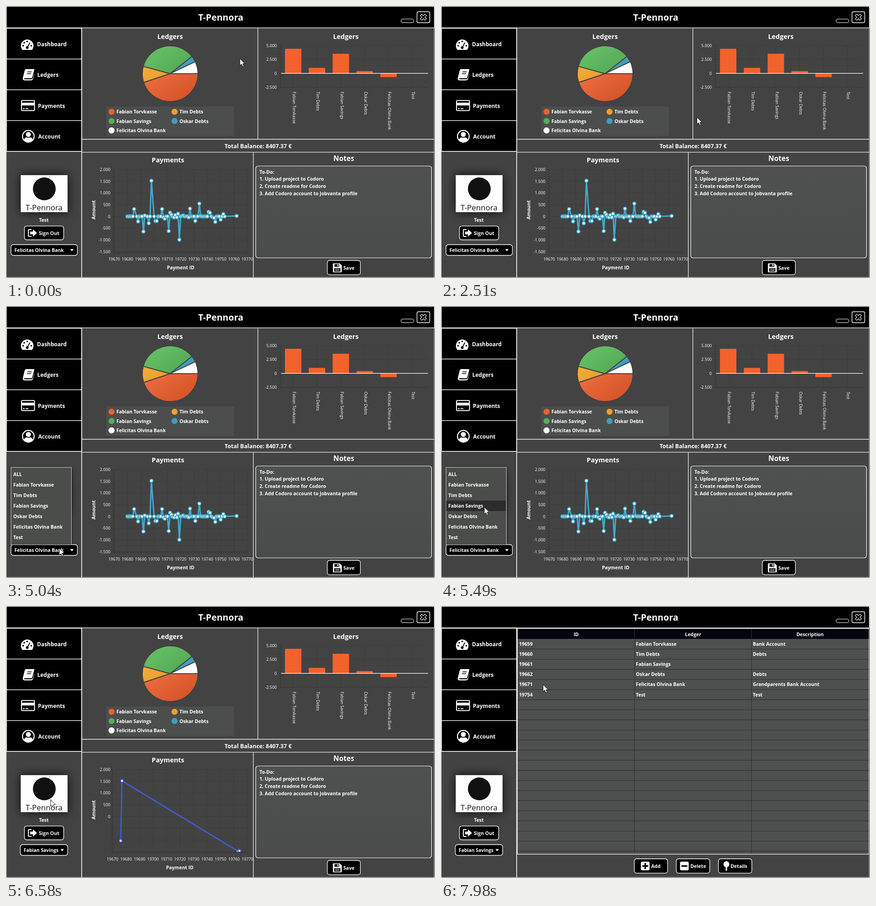
Animation of 941 by 595 pixels, one loop 8000 ms. Source, as an HTML page:

```html
<!DOCTYPE html>
<html lang="en">
<head>
<meta charset="utf-8">
<title>T-Pennora</title>
<style>
  html, body { margin: 0; width: 100%; height: 100%; overflow: hidden; background: #434343; }
  svg { display: block; font-family: "Open Sans", "Noto Sans", sans-serif; }
  text { fill: #fff; white-space: pre; }
</style>
</head>
<body>
<svg id="stage" width="941" height="595" viewBox="0 0 941 595"></svg>
<script>
const APP = 'T-Pennora';
const LEDGERS = ['Fabian Torvkasse', 'Tim Debts', 'Fabian Savings', 'Oskar Debts', 'Felicitas Olvina Bank', 'Test'];
const $ = id => document.getElementById(id);
const clamp = v => Math.max(0, Math.min(1, v));
const lerp = (a, b, k) => a + (b - a) * k;

// Text is placed by the vertical middle of its capitals.
const text = (x, mid, str, size = 10.4, anchor = 'start', weight = 700, more = '') =>
  `<text x="${x}" y="${mid + size * .36}" font-size="${size}" text-anchor="${anchor}" font-weight="${weight}" ${more}>${str}</text>`;
const rect = (x, y, w, h, fill, more = '') =>
  `<rect x="${x}" y="${y}" width="${w}" height="${h}" fill="${fill}" ${more}/>`;
const path = (d, fill = '#fff', more = '') => `<path d="${d}" fill="${fill}" ${more}/>`;
const line = (d, color, width = 1, more = '') =>
  path(d, 'none', `stroke="${color}" stroke-width="${width}" ${more}`);
const dot = (x, y, r, fill, more = '') => `<circle cx="${x}" cy="${y}" r="${r}" fill="${fill}" ${more}/>`;
const group = (id, body, more = '') => `<g id="${id}" ${more}>${body}</g>`;
const button = (x, y, w, h, body = '') =>
  rect(x, y, w, h, '#000', 'rx="5" stroke="#fff" stroke-width="1.3"') + body;
const GRID = '#393939', DASH = 'stroke-dasharray="3 2"';

const defs = () => {
  const tones = [['#f8784a', '#d45427'], ['#fbb040', '#d88e1e'], ['#66bf66', '#489a49'], ['#48acca', '#388fac'], ['#fff', '#fff']];
  return `<defs>${tones.map(([a, b], i) =>
    `<linearGradient id="tone${i}" gradientUnits="userSpaceOnUse" x1="320" y1="95" x2="395" y2="205">
      <stop stop-color="${a}"/><stop offset="1" stop-color="${b}"/></linearGradient>`).join('')}
    <linearGradient id="panel" x2="0" y2="1"><stop stop-color="#4f5150"/><stop offset="1" stop-color="#4a4c4b"/></linearGradient>
    <clipPath id="plot"><path d="M225 350H540V538H225Z"/></clipPath>
    <filter id="shade" x="-50%" y="-50%" width="200%" height="200%">
      <feDropShadow dx="0" dy="0" stdDeviation="12" flood-color="#000" flood-opacity=".8"/></filter>
    <filter id="soft" x="-20%" y="-20%" width="140%" height="140%">
      <feDropShadow dx="1" dy="2" stdDeviation="3" flood-color="#000" flood-opacity=".5"/></filter></defs>`;
};

const header = () =>
  rect(0, 0, 941, 48.5, '#ddd') + rect(1.5, 1.5, 937.5, 45.5, '#000') +
  text(471, 25, APP, 19.6, 'middle') +
  rect(866.5, 28.5, 28, 8, '#000', 'rx="3.5" stroke="#fff"') +
  rect(901.5, 12.5, 28, 24, '#000', 'rx="3" stroke="#fff" stroke-width="1.4"') +
  line('M910 19L921 30M921 19L910 30', '#fff', 6) +
  line('M910.7 19.7L920.3 29.3M920.3 19.7L910.7 29.3', '#000', 3.6);

const gaugeIcon = () =>
  path('M36 96A13.8 13.8 0 1 1 57 96Z') +
  [[37.5, 87], [40, 80.5], [46.5, 77.5], [55.5, 87]].map(([x, y]) => dot(x, y, 1.8, '#000')).join('') +
  line('M46.5 91L52.5 80', '#000', 1.8) + dot(46.5, 91, 3, '#000');
const bookIcon = () =>
  path('M44 138H61Q62.5 138 62 140L57.5 156Q57 158 55 158H40Q39 160 41 160.3H56Q58 160 59 157L62 147V149L59 160Q58 162.7 55 162.7H40Q36 162 37 157L41 141Q42 138 44 138Z') +
  line('M47 144H56.5M45.8 148H55.3', '#000', 1.6);
const cardIcon = () =>
  rect(34, 206.8, 28.5, 22, '#000', 'rx="2" stroke="#fff" stroke-width="2"') +
  rect(34, 211.5, 28.5, 6, '#fff') + line('M37 224.5H41M43 224.5H49', '#fff', 1.8);
const userIcon = () =>
  dot(49, 285, 12.8, '#000', 'stroke="#fff" stroke-width="2.3"') + dot(49, 281, 5.5, '#fff') +
  path('M39.5 292.5Q41 287.5 45 287.2Q49 289.5 53 287.2Q57 287.5 58.5 292.5Q55 297 49 297Q43 297 39.5 292.5Z');

const sidebar = () =>
  rect(0, 48, 167, 270.8, '#fff') +
  [0, 1, 2, 3].map(i => rect(1.8, 49.4 + 67.3 * i, 163.4, 65.9, '#000')).join('') +
  gaugeIcon() + bookIcon() + cardIcon() + userIcon() +
  text(68, 83.7, 'Dashboard', 12) + text(68.5, 151, 'Ledgers', 12) +
  text(70, 218.3, 'Payments', 12) + text(70.5, 285.6, 'Account', 12) +
  rect(32.5, 370, 102.5, 81, '#fff', 'filter="url(#shade)"') + dot(84, 400, 25, '#111') +
  text(83.5, 441, APP, 17, 'middle', 400, 'style="fill:#111"') +
  text(83, 468.5, 'Test', 10.4, 'middle') +
  button(40.5, 481.3, 86, 30.2,
    line('M56 489H51Q49 489 49 491V502Q49 504 51 504H56', '#fff', 2) +
    path('M53 493.5H59V488.5L68 496.5L59 504.5V499.5H53Z') + text(72, 497, 'Sign Out', 10.6));

const combo = (x, w, name) =>
  button(x, 522, w, 23.5, text(x + 7.5, 534, name) + path(`M${x + w - 16} 531.8h8l-4 4.8Z`));

const pie = () => {
  const cuts = [0, 161.6, 195.4, 321.8, 334.7, 360].map(a => a * Math.PI / 180);
  const at = a => `${360 + 61 * Math.cos(a)} ${148 + 61 * Math.sin(a)}`;
  const slices = cuts.slice(1).map((a, i) =>
    path(`M360 148L${at(cuts[i])}A61 61 0 0 1 ${at(a)}Z`, `url(#tone${i})`, 'stroke="#414141" stroke-width="1.9"'));
  const hues = ['#ea6135', '#f0a02a', '#55ae55', '#3f9dbd', '#fff'];
  const legend = hues.map((c, i) => {
    const x = i % 2 ? 369.7 : 231.5, y = 231.3 + 20.4 * (i >> 1);
    return dot(x, y, 6.6, c) + text(x + 10.7, y + .2, LEDGERS[i]);
  });
  return text(360, 67.3, 'Ledgers', 14.4, 'middle') + slices.join('') +
    rect(220, 220, 280, 64, '#4c4e4d', 'rx="2"') + legend.join('');
};

const bars = () => {
  const zero = 147.4, heights = [53.8, 12, 43, 5, -8.2, 0];
  let out = text(745.5, 66.4, 'Ledgers', 14.4, 'middle');
  ['5.000', '2.500', '0', '-2.500'].forEach((s, i) => {
    const y = 86.5 + 30.4 * i;
    out += line(`M603 ${y}H926`, GRID, 1, DASH) + text(594, y, s, 9, 'end', 400);
  });
  out += line('M602.5 86V178H926', '#363636') + line('M600 86V178', '#363636', 4, 'stroke-dasharray="1 5.08"');
  heights.forEach((h, i) => {
    const x = 629.9 + 52.3 * i;
    out += line(`M${x} 86V178`, GRID, 1, DASH) +
      rect(x - 18, zero - Math.max(h, 0), 36, Math.abs(h), '#f3622d') +
      text(0, 0, LEDGERS[i], 8.8, 'start', 400, `transform="translate(${x + 2.2} 187.5) rotate(90)"`);
  });
  return out + line(`M603 ${zero}H926`, '#fff', 1.3);
};

const floppy = () =>
  path('M718.5 563H732L736.5 567.5V581Q736.5 582.5 735 582.5H718.5Q717 582.5 717 581V564.5Q717 563 718.5 563Z') +
  rect(720.5, 564.5, 10.5, 6, '#000') + rect(727, 565.3, 2.4, 4, '#fff') +
  rect(720, 573.5, 13.5, 7.5, '#000') + line('M722 576H731.5M722 578.7H731.5', '#fff', 1);

const notes = () =>
  text(741, 333.5, 'Notes', 15.5, 'middle') +
  rect(547.8, 350, 385.6, 201, 'url(#panel)', 'rx="5" stroke="#fff" stroke-width="1.2"') +
  ['To-Do:', '1. Upload project to Codoro', '2. Create readme for Codoro', '3. Add Codoro account to Jobvanta profile']
    .map((s, i) => text(556, 363 + 15.6 * i, s)).join('') +
  button(704.7, 556.5, 72.6, 31.3, floppy() + text(740, 573, 'Save', 10.6));

const dashboard = () =>
  line('M167 291.5H940M167 319.8H940M552.5 49V291M542.5 320V594', '#eee', 1.3) +
  pie() + bars() + text(553, 306, 'Total Balance: 8407.37 €', 12.5, 'middle') +
  text(355.3, 337.2, 'Payments', 14.4, 'middle') +
  text(0, 0, 'Amount', 10.4, 'middle', 700, 'transform="translate(192 446) rotate(-90)"') +
  group('chart', '') + notes();

const table = () => {
  const ids = [19659, 19660, 19661, 19662, 19671, 19754];
  const about = ['Bank Account', 'Debts', '', 'Debts', 'Grandparents Bank Account', 'Test'];
  let out = rect(167, 49, 773, 494.5, '#fff') + rect(168, 50, 770.5, 492.3, '#4e504f') + rect(168, 50, 770.5, 22, '#04050d') +
    text(296.5, 62, 'ID', 10.4, 'middle') + text(553, 62, 'Ledger', 10.4, 'middle') + text(809.5, 62, 'Description', 10.4, 'middle');
  for (let i = 1; i <= 21; i++) out += line(`M168 ${72.3 + 22.1 * i}H938.5`, '#303030', 1.1);
  out += line('M424.5 50V542M681 50V542', '#303030', 1.1);
  ids.forEach((id, i) => {
    const y = 83.3 + 22.1 * i;
    out += text(171.3, y, id) + text(427.5, y, LEDGERS[i]) + text(684, y, about[i]);
  });
  const tile = x => rect(x, 559.3, 19, 19, '#fff', 'rx="3"');
  return out +
    button(424, 553, 73, 31.3, tile(438.5) + line('M441.5 568.8H454.5M448 562.3V575.3', '#000', 3.4) + text(461, 569, 'Add', 10.6)) +
    button(516, 553, 73.5, 31.3, tile(524.3) + line('M527.3 568.8H540.3', '#000', 3.4) + text(547, 569, 'Delete', 10.6)) +
    button(608.5, 553, 73.3, 31.3, dot(626, 564.8, 6.5, '#fff') + line('M626 570V579', '#fff', 3.2) + text(635, 569, 'Details', 10.6));
};

const tooltip = () =>
  rect(327.5, 387.5, 112, 83, '#1c1c1c', 'fill-opacity=".93" stroke="#c8c8c8" stroke-width="1.6" filter="url(#soft)"') +
  line('M438.6 388V469.6H328', '#eee', 1.4) +
  ['19698', 'UDO FALKNER', '20.02.2020', 'SVWZ+Rueckzahlung', '1500.0']
    .map((s, i) => text(335, 401 + 13.8 * i, s, 9.2)).join('');

const ROW = 23, LIST_TOP = 356.6;
const popup = () =>
  rect(11, 353, 132.5, 169.5, '#4b4d4c', 'stroke="#ccc" filter="url(#soft)"') +
  rect(11.5, 0, 131, ROW, '#2c2c2c', 'id="hover"') +
  ['ALL', ...LEDGERS].map((s, i) => text(16, 368.5 + ROW * i, s)).join('');

// Vertical offsets of the payments, in pixels from the zero line; all others are zero.
const SPIKES = { 5: -16, 8: 11, 12: 33, 13: -2, 16: 15, 18: -78, 21: 10, 22: 10, 26: -16, 27: 2, 28: 5, 31: 32, 32: -8, 33: -4,
  34: 1, 35: 2, 36: -3, 37: 2, 38: -6, 39: 51, 41: -1, 42: -2, 46: 2, 47: -17, 51: 10, 54: -28, 55: -1, 61: -10, 62: -8,
  64: 2, 65: 3, 66: 12, 70: 7, 72: -5, 82: -1 };
const PAYMENTS = [...Array(74).keys(), 82].filter(i => ![6, 14, 19].includes(i));
const SAVINGS = [[6, 425, 513.5], [7, 479, 382.5], [93, 416, 536.5], [94, 417, 535.5]];

const series = (pts, color, r, opacity) => `<g opacity="${opacity}" clip-path="url(#plot)">` +
  line('M' + pts.map(p => p.join(' ')).join('L'), color, 3.1, 'stroke-linejoin="round"') +
  pts.map(([x, y]) => dot(x, y, r, '#fff', `stroke="${color}" stroke-width="2"`)).join('') + '</g>';

function chart(switched, k) {
  const x0 = switched ? 233.7 : 237.2, step = k < 1 ? 29.2 : 29.6;
  const dim = 1 - .5 * Math.sin(Math.PI * k);
  let out = line(`M${x0} 357V538H530`, '#363636') +
    line(`M${x0 - 2.5} 357.5V538`, '#363636', 4, 'stroke-dasharray="1 4.14"') +
    line(`M${x0} 540H530`, '#363636', 4, `stroke-dasharray="1 ${step / 5 - 1}"`);
  for (let i = 0; i < 8; i++) {
    const v = 2000 - 500 * i, y = 357.6 + 25.72 * i;
    const label = Math.abs(v) < 1000 ? v : (v / 1000).toFixed(3);
    out += line(`M${x0} ${y}H530`, GRID, 1, DASH) +
      text(229, y, label, 9, 'end', 400, `opacity="${v < 0 ? Math.min(dim, (1 - k) * 1.2) : dim}"`);
  }
  for (let i = 0; i < 11; i++) {
    const x = x0 + step * i;
    out += line(`M${x} 357V538`, GRID, 1, DASH) + text(x, 553.5, 19670 + 10 * i, 8.9, 'middle', 400, `opacity="${dim}"`);
  }
  out += text(switched ? 381 : 383, 572, 'Payment ID', 10.4, 'middle');
  if (k < 1) out += series(PAYMENTS.map(i =>
    [x0 + 29.2 + 2.92 * i, 460.3 + 26 * k + (SPIKES[i] || 0) * (1 - .41 * k)]), '#41a9c9', 3.5, clamp((1 - k) * 5));
  if (k > 0) out += series(SAVINGS.map(([i, from, to]) =>
    [x0 + step / 10 * i, lerp(from, to, k)]), '#4258c9', 3.2, clamp(k * 1.4));
  return out;
}

// Pointer path: time, x, y. Two entries with one time make a jump.
const POINTER = [[0, 513, 115], [180, 513, 115], [380, 366, 105], [470, 419, 111], [900, 419, 111], [900, 368, 134],
  [1310, 368, 134], [1430, 450, 110], [1540, 638, 131], [1970, 638, 131], [1970, 694, 143], [2310, 694, 143],
  [2390, 660, 125], [2510, 562, 243], [2960, 340, 368], [3120, 318, 382], [4210, 318, 382], [4210, 298, 377],
  [4720, 117, 531], [5040, 117, 530], [5490, 95, 440], [6110, 95, 439], [6320, 98, 425], [6580, 98, 424],
  [7150, 62, 142], [7380, 62, 142], [7530, 359, 323], [7870, 359, 323], [7980, 224, 172], [8000, 224, 172]];

function pointerAt(t) {
  const i = POINTER.findLastIndex(p => p[0] <= t);
  const a = POINTER[i], b = POINTER[i + 1] || a;
  const k = b === a ? 0 : (t - a[0]) / (b[0] - a[0]);
  return [lerp(a[1], b[1], k), lerp(a[2], b[2], k)];
}

$('stage').innerHTML = defs() + rect(0, 0, 941, 595, '#434343') +
  group('dashboard', dashboard()) + group('table', table()) + header() + sidebar() +
  line('M.5 0V595M939.5 0V595M0 593.8H941', '#ddd', 1.2) + line('M166 319V594', '#fff', 1.6) +
  group('comboBank', combo(11, 145.5, LEDGERS[4])) + group('comboSavings', combo(31.3, 104, LEDGERS[2])) +
  group('tooltip', tooltip()) + group('popup', popup()) +
  group('pointer', path('M0 0V15.2L3.5 12L6.1 17.6L8.6 16.5L6.1 11.1H10.8Z', '#fff', 'stroke="#000" stroke-width=".9"'));

const show = (id, on) => $(id).setAttribute('display', on ? 'inline' : 'none');
let drawn;

function draw(t) {
  const [x, y] = pointerAt(t);
  const switched = t >= 5920, ledgers = t >= 7380;
  $('pointer').setAttribute('transform', `translate(${x} ${y})`);
  show('dashboard', !ledgers);
  show('table', ledgers);
  show('comboBank', !switched);
  show('comboSavings', switched);
  show('tooltip', t >= 3550 && t < 4400);
  show('popup', t >= 4780 && !switched);

  const row = Math.floor((y - LIST_TOP) / ROW);
  show('hover', row < 7);
  $('hover').setAttribute('y', LIST_TOP + ROW * row);

  const k = clamp((t - 5920) / 400), state = `${switched} ${k}`;
  if (state !== drawn) {
    $('chart').innerHTML = chart(switched, k);
    drawn = state;
  }
}

const start = performance.now();
(function tick() {
  draw((performance.now() - start) % 8000);
  requestAnimationFrame(tick);
})();
</script>
</body>
</html>
```
